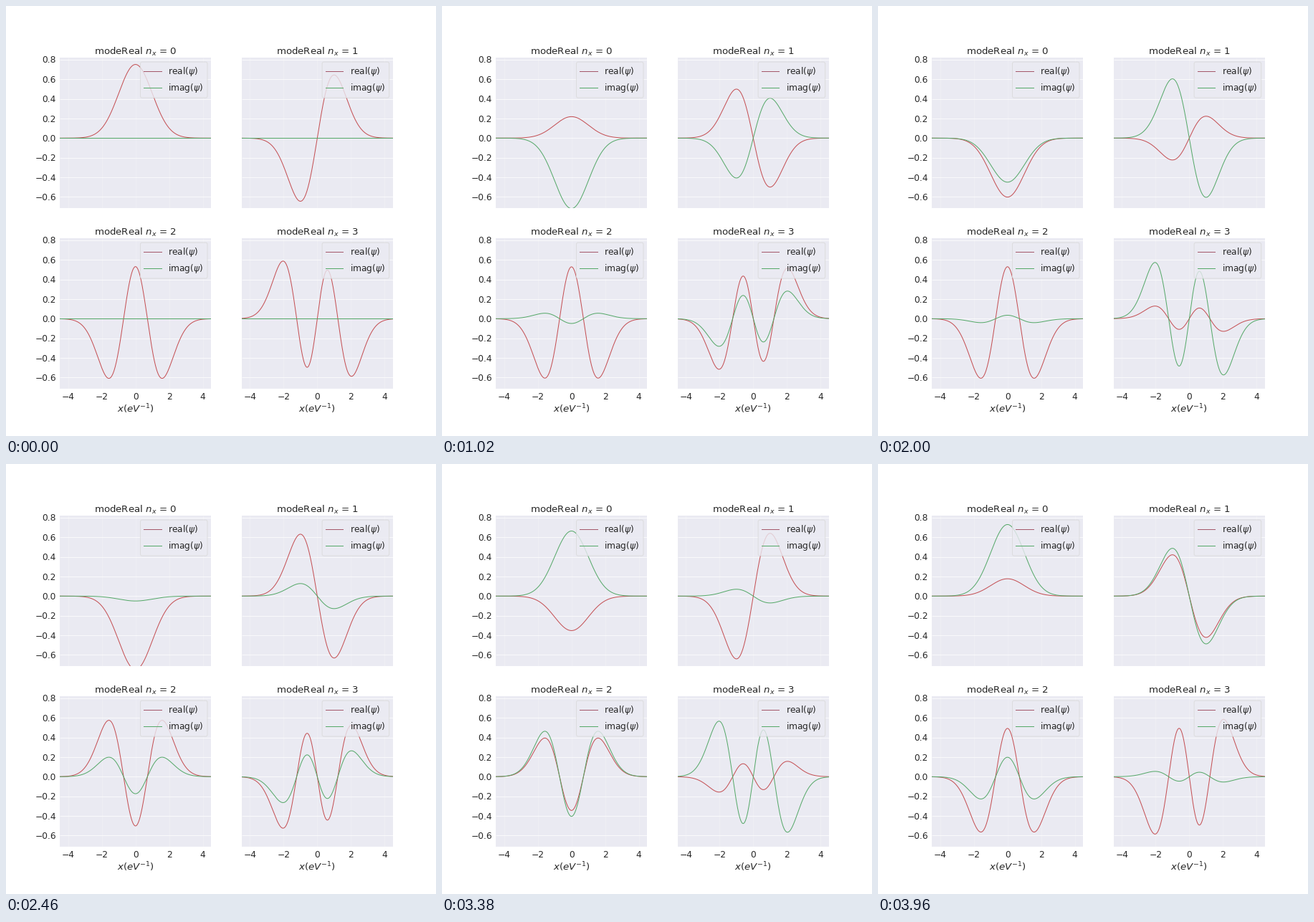
These frames come from a looping animation (600x600 px, 3980 ms). A matplotlib script:

```python
import math

import matplotlib.pyplot as plt
import numpy as np
from matplotlib.animation import FuncAnimation
from matplotlib.lines import Line2D
from matplotlib.patches import FancyBboxPatch
from matplotlib.transforms import Affine2D

SIZE, DPI = 600, 80
FRAMES, INTERVAL = 199, 20
DT = 0.05
SIGNS = (1, 1, -1, -1)
RED, GREEN, KEY_RED = "#C44E52", "#55A868", "#A4586A"
PANEL, INK = "#EAEAF2", "#262626"
XLIM, YLIM = (-4.5, 4.5), (-0.714, 0.821)

plt.rcParams.update({
    "font.family": "DejaVu Sans",
    "mathtext.fontset": "dejavusans",
    "text.color": INK,
})

fig, axes = plt.subplots(
    2, 2, figsize=(SIZE / DPI, SIZE / DPI), dpi=DPI, facecolor="white",
    gridspec_kw=dict(left=0.125, right=0.9, bottom=0.11, top=0.88,
                     wspace=0.2, hspace=0.2))
# Pixel coordinates with the origin at the top left
pixels = Affine2D().scale(1 / SIZE, -1 / SIZE).translate(0, 1) + fig.transFigure


def label(x, y, text, size=11, ha="center"):
    fig.text(x, y, text, fontsize=size, ha=ha, va="baseline",
             transform=pixels, zorder=6)


def eigenstate(n, x):
    hermite = np.polynomial.hermite.hermval(x, [0] * n + [1])
    norm = math.sqrt(2**n * math.factorial(n) * math.sqrt(math.pi))
    return hermite * np.exp(-x**2 / 2) / norm


def draw_legend(left, top):
    fig.add_artist(FancyBboxPatch(
        (left + 112.5, top + 6.1), 93.5, 50,
        boxstyle="round,pad=0,rounding_size=2.4", facecolor=PANEL,
        edgecolor="0.85", linewidth=0.9, alpha=0.8,
        transform=pixels, zorder=4))
    for y, color, part in ((19, KEY_RED, "real"), (42, GREEN, "imag")):
        fig.add_artist(Line2D(
            [left + 117.2, left + 141.6], [top + y, top + y], color=color,
            linewidth=0.9, transform=pixels, zorder=5))
        label(left + 151.4, top + y + 4.3, rf"{part}($\psi$)", ha="left")


def draw_panel(ax, n):
    ax.set(xlim=XLIM, ylim=YLIM, facecolor=PANEL)
    ax.xaxis.set_visible(False)
    ax.yaxis.set_visible(False)
    ax.spines[:].set_visible(False)
    ax.hlines(np.arange(-3, 5) / 5, *XLIM, color="white", lw=0.9,
              alpha=0.75, zorder=1)
    ax.vlines(np.arange(-4, 5, 2), *YLIM, color="white", lw=0.9,
              alpha=0.2, zorder=1)

    box = ax.get_position()
    left, top = box.x0 * SIZE, (1 - box.y1) * SIZE
    width, height = box.width * SIZE, box.height * SIZE
    middle = left + width / 2
    label(middle, top - 3.8, f"modeReal $n_x$ = {n}", 12)
    draw_legend(left, top)

    if n % 2 == 0:
        for k in range(-3, 5):
            y = top + height * (YLIM[1] - k / 5) / (YLIM[1] - YLIM[0])
            label(70, y + 4.6, f"{k / 5:.1f}".replace("-", "\u2212"),
                  ha="right")
    if n >= 2:
        for v in range(-4, 5, 2):
            label(middle + v * width / 9, top + height + 15.4,
                  str(v).replace("-", "\u2212"))
        label(middle, top + height + 33, "$x(eV^{-1})$", 12)


x = np.linspace(*XLIM, 400)
states = [sign * eigenstate(n, x) for n, sign in enumerate(SIGNS)]
curves = []
for n, ax in enumerate(axes.flat):
    draw_panel(ax, n)
    curves.append([ax.plot(x, 0 * x, color=c, lw=0.9, zorder=2)[0]
                   for c in (RED, GREEN)])


def update(frame):
    for n, (real, imag) in enumerate(curves):
        phase = (n + 0.5) * DT * frame
        real.set_ydata(states[n] * math.cos(phase))
        imag.set_ydata(-states[n] * math.sin(phase))
    return [line for pair in curves for line in pair]


anim = FuncAnimation(fig, update, frames=FRAMES, interval=INTERVAL,
                     repeat=True, repeat_delay=0, blit=False)
plt.show()
```
